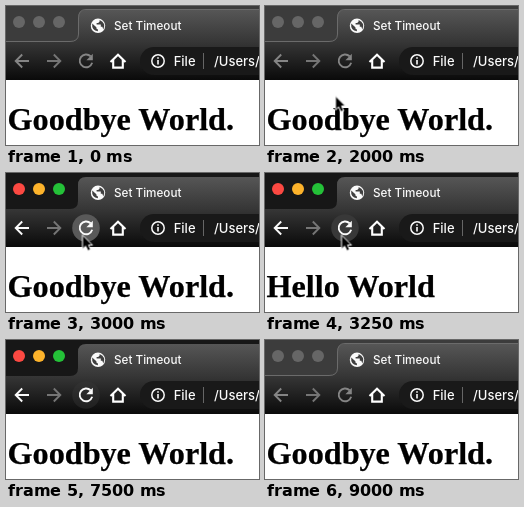
These frames come from a looping animation (253x139 px, 9250 ms). An HTML page:

```html
<!DOCTYPE html>
<html lang="en">
<head>
<meta charset="utf-8">
<title>Set Timeout</title>
<style>
  html, body { margin: 0; width: 100%; height: 100%; overflow: hidden; background: #fff; }
  svg { display: block; width: 253px; height: 139px; }
  text { white-space: pre; }
  .ui { font-family: Inter, Roboto, sans-serif; font-weight: 500; fill: #fafafa; }
  .title { font: bold 32.2px "Liberation Serif", Times, serif; fill: #000; stroke: #000; stroke-width: .25; }
  .line { fill: none; stroke: currentColor; stroke-width: 1.9; }

  .focus, .blur, .hello, .bye, .cursor, .hover, .nav { animation: 9.25s step-end infinite; }
  .focus { animation-name: focus; }
  .blur { animation-name: blur; }
  .nav { animation-name: nav; }
  .hello { animation-name: hello; }
  .bye { animation-name: bye; }
  .cursor { animation-name: cursor; }
  .hover { animation-name: hover; }

  /* window is active from 2250 to 9000 ms */
  @keyframes focus { 0%, 97.297% { opacity: 0 } 24.324% { opacity: 1 } }
  @keyframes blur { 0%, 97.297% { opacity: 1 } 24.324% { opacity: 0 } }
  @keyframes nav { 0%, 97.297% { color: #858585 } 24.324% { color: #fafafa } }

  /* page reloads at 3250 ms, its timer fires at 6250 ms */
  @keyframes hello { 0%, 67.568% { opacity: 0 } 35.135% { opacity: 1 } }
  @keyframes bye { 0%, 67.568% { opacity: 1 } 35.135% { opacity: 0 } }

  @keyframes cursor {
    0% { opacity: 0; transform: translate(161.5px, 89.5px) }
    18.919% { opacity: 1; transform: translate(161.5px, 89.5px) }
    21.622% { opacity: 1; transform: translate(70.5px, 89.5px) }
    24.324% { opacity: 1; transform: translate(70.5px, 86.5px) }
    27.027% { opacity: 1; transform: translate(76.5px, 63.5px) }
    29.73% { opacity: 1; transform: translate(76.5px, 61.5px) }
    81.081%, 100% { opacity: 0; transform: translate(76.5px, 61.5px) }
  }
  @keyframes hover {
    0%, 83.784% { opacity: 0 }
    27.027% { opacity: .6 }
    29.73% { opacity: 1 }
    32.432% { opacity: 1; fill: #595959 }
    35.135% { opacity: 1; fill: #383838 }
    81.081% { opacity: .4 }
  }
</style>
</head>
<body>
<svg viewBox="0 0 253 139">
  <defs>
    <linearGradient id="chrome" gradientUnits="userSpaceOnUse" x1="0" y1="4" x2="0" y2="74">
      <stop offset="0" stop-color="#565656"/>
      <stop offset=".46" stop-color="#363636"/>
      <stop offset="1" stop-color="#0a0a0a"/>
    </linearGradient>
  </defs>

  <rect width="253" height="139" fill="#fff"/>

  <!-- tab strip -->
  <rect width="253" height="74" fill="#171717"/>
  <rect class="blur" width="253" height="74" fill="#3c3c3c"/>
  <path d="M0 36H64Q72 36 72 28V12Q72 4 80 4H253V74H0Z" fill="url(#chrome)"/>
  <path class="blur" d="M0 35.5H64Q72.5 35.5 72.5 28V12Q72.5 3.5 80 3.5H253" fill="none" stroke="#6b6b6b"/>
  <g class="blur" fill="#666">
    <circle cx="13" cy="16" r="6"/><circle cx="33" cy="16" r="6"/><circle cx="53" cy="16" r="6"/>
  </g>
  <g class="focus">
    <circle cx="13" cy="16" r="6" fill="#fc4942"/>
    <circle cx="33" cy="16" r="6" fill="#fdb32b"/>
    <circle cx="53" cy="16" r="6" fill="#24c138"/>
  </g>

  <!-- globe and tab title -->
  <circle cx="92" cy="19.8" r="7.2" fill="#fafafa"/>
  <path d="M86.2 17.6l4.2 3.6v1.4l1.5 1v1.7q-6.4-.6-5.7-7.7zM93.6 14v1.6l-1.4 1.3h-1.6v1.7h4.2v2.2h1.5l1.1 2.6q3-6.2-3.8-9.4z" fill="#404040"/>
  <text class="ui" x="108" y="24" font-size="11.7">Set Timeout</text>

  <!-- toolbar -->
  <rect x="134" y="41" width="140" height="28" rx="14" fill="#191919"/>
  <circle class="hover" cx="80" cy="55" r="13.8" fill="#383838"/>
  <g class="nav">
    <path class="line" d="M23 55H10M16.2 48.5L9.7 55l6.5 6.5"/>
    <path class="line" d="M84.6 50.3A6.4 6.4 0 1 0 86.2 56.8"/>
    <path d="M86.8 47.8v6.4h-6.4z" fill="currentColor"/>
  </g>
  <path class="line" color="#757575" d="M41 55h13M47.8 48.5l6.5 6.5-6.5 6.5"/>
  <path class="line" color="#fff" d="M104.5 56L112 48.8l7.5 7.2M107.2 54v7.6h9.6V54" style="stroke-width:2.1"/>
  <circle class="line" color="#fafafa" cx="152" cy="55" r="6.2" style="stroke-width:1.5"/>
  <path d="M151.2 54h1.6v4.5h-1.6zM151.2 51.2h1.6v1.6h-1.6z" fill="#fafafa"/>
  <text class="ui" x="167.7" y="60" font-size="13">File</text>
  <rect x="197" y="47" width="1" height="16" fill="#666"/>
  <text class="ui" x="208" y="60" font-size="13">/Users/</text>

  <!-- page -->
  <text class="title bye" x="1.5" y="124">Goodbye World.</text>
  <text class="title hello" x="1.5" y="124">Hello World</text>

  <path class="cursor" d="M0 .5V14.5L3.2 11.6 5.5 16.3 8.2 15.2 6 10.6H10Z" fill="#000" stroke="#fff" stroke-linejoin="round"/>
</svg>
</body>
</html>
```
